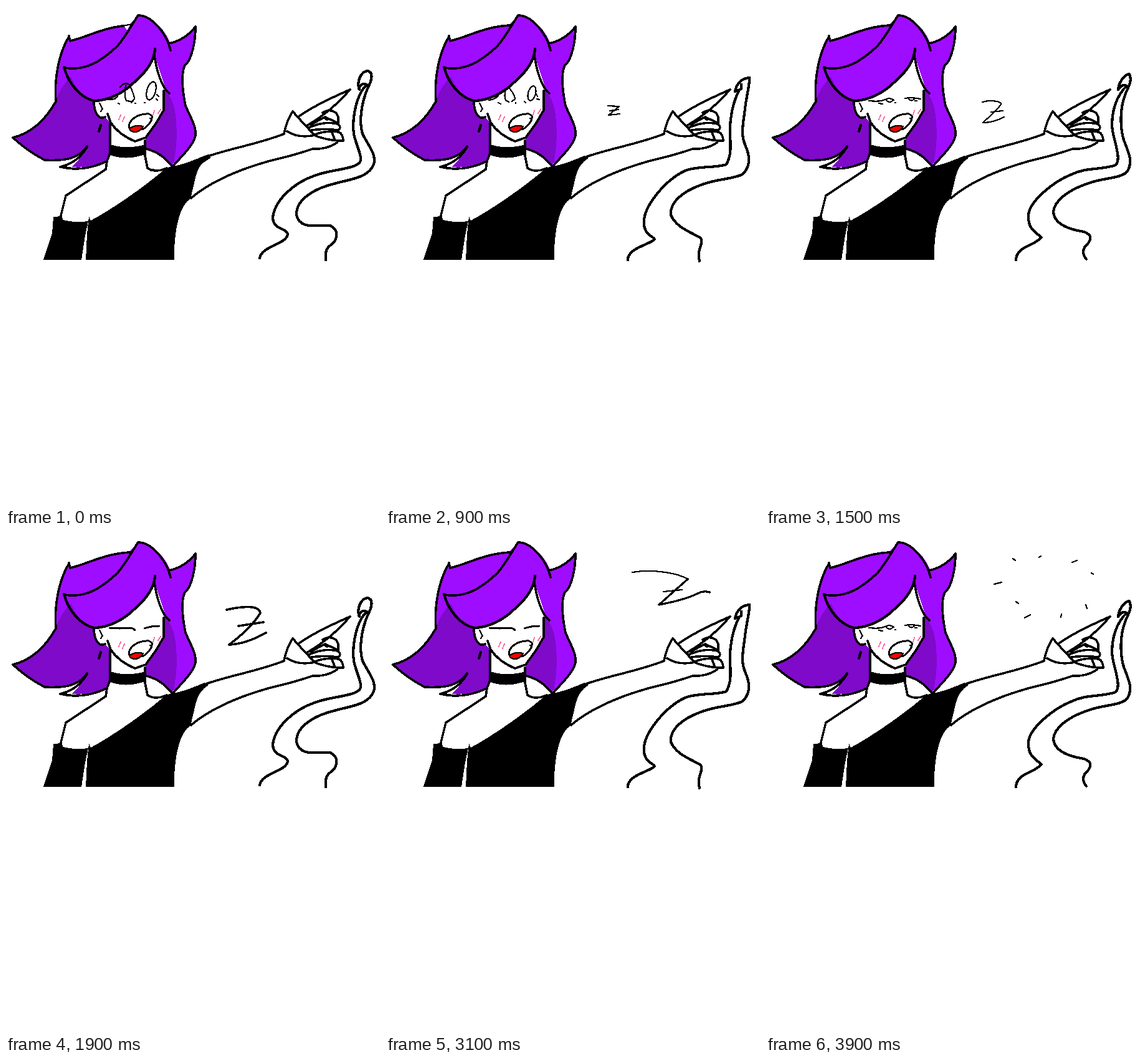
Animation of 600x800 px, one loop 3950 ms. Source, as an HTML page:

```html
<!DOCTYPE html>
<html lang="en">
<head>
<meta charset="utf-8">
<title>Sleepy spell</title>
<style>
html, body { margin: 0; width: 100%; height: 100%; overflow: hidden; background: #fff; }
svg { display: block; width: 600px; height: 800px; fill: none; stroke: #000; stroke-width: 3.6;
  stroke-linecap: round; stroke-linejoin: round; shape-rendering: crispEdges; }
.flat { stroke: none; }
.thin { stroke-width: 2.2; }
.thick { stroke-width: 4.2; }
.white { fill: #fff; }
.black { fill: #000; }
.bright { fill: #9e0dff; }
.dark { fill: #7f0aca; }
[data-part] { display: none; }
</style>
</head>
<body>
<svg viewBox="0 0 600 800">
  <!-- hair -->
  <g class="flat">
    <path class="dark" d="M112 100L85 125L80 153C62 185 40 204 11 211Q35 233 62 247C95 249 118 244 130 225Q121 245 105 258Q135 261 162 249L168 235V185L141 152Z"/>
    <path class="dark" d="M254 130H275L285 200L267 257Q248 235 224 228L223 214L253 168Z"/>
    <path class="bright" d="M100 48L103 56C130 50 160 32 198 30L212 15C235 15 255 38 264 60Q288 54 304 33C304 60 297 88 287 96C280 110 284 140 288 160C297 180 306 195 304 208C300 225 282 240 268 257Q278 210 271 168Q267 148 258 139L238 78C232 94 215 114 205 123C180 144 158 152 141 152Q118 145 104 113Q88 129 80 151C77 112 85 75 100 48Z"/>
    <path class="white" d="M141 152C170 151 193 137 205 123C218 111 232 94 238 80Q242 110 254 136L253 166L240 189L223 215V240L227 262L258 260L135 345L87 341L96 304L161 262L168 235V187L158 178Q144 183 141 152Z"/>
  </g>

  <!-- dress -->
  <g class="black flat">
    <path d="M133 337L136 344C170 326 222 290 258 259Q285 255 318 240L325 244Q309 253 304 275L296 309C280 318 269 355 270 407H128L130 366Z"/>
    <path d="M76 338L90 337L91 343Q110 348 132 345L127 368L121 407H60L74 365Z"/>
    <path d="M165 221Q190 231 225 222V237Q195 249 167 239Z"/>
  </g>

  <!-- hair lines -->
  <path d="M101 49C85 75 77 115 80 153C62 185 40 204 11 211Q35 233 62 247C95 249 118 244 130 225"/>
  <path d="M130 226Q116 251 87 258Q123 267 162 249M88 258L103 260"/>
  <path d="M101 48L103 56C130 50 160 32 200 31"/>
  <path d="M95 99C130 105 155 86 178 65C193 48 201 31 212 15C235 15 258 45 264 71"/>
  <path class="thick" d="M93 98C100 125 120 147 141 152C165 152 190 138 205 123C225 106 238 88 239 69"/>
  <path d="M238 77C240 98 249 130 262 140"/>
  <path d="M262 60Q288 54 304 33C304 60 297 88 287 95C280 110 284 140 288 160C297 180 306 195 304 208C300 225 282 240 267 258Q250 235 225 229"/>

  <!-- head and shoulders -->
  <path d="M141 152C141 170 148 183 159 178M163 173L168 187Q182 207 207 217L224 211L240 189L253 167V136"/>
  <path class="thin" d="M150 156L155 165L152 169"/>
  <path class="thick" d="M152 191L149 201"/>
  <path d="M167 188V236L162 249L160 262L96 304L87 340M223 216V240L227 260Q240 268 258 260"/>
  <path stroke-width="3" d="M198 196Q196 191 200 185C206 177 218 172 229 173Q238 177 233 181L231 180M234 182Q228 193 219 198"/>
  <path class="thin" fill="#f00" d="M198 197Q207 189 220 193Q216 202 206 202Q199 201 198 197Z"/>
  <path stroke="#ff5a9a" stroke-width="1.6" d="M184 175L181 182M190 178L187 185M238 168L236 174M248 166L244 172"/>

  <!-- arm and hand -->
  <path d="M318 243C352 230 410 220 446 205M297 308C332 278 390 255 449 242Q475 235 492 229C508 230 522 225 531 219"/>
  <path d="M446 205Q450 184 460 169Q473 184 495 207M451 201C465 210 482 210 496 207"/>
  <path d="M470 177C490 162 520 148 552 134C535 153 515 173 484 191"/>
  <path d="M508 171C517 165 530 167 533 178V188M489 190L512 178L529 186M510 179L515 182"/>
  <path d="M486 195Q510 184 532 189Q539 194 533 199Q510 196 490 199"/>
  <path d="M494 207Q510 199 534 202Q541 206 541 216Q515 216 494 207M523 203L527 213"/>

  <!-- first strokes -->
  <g data-part="rough">
    <path class="white flat" d="M190 32L199 31L194 39Z"/>
    <path class="black thin" d="M316 242L325 239L327 243L315 251Z"/>
    <path class="thin" d="M227 259L232 264L237 262M163 150L175 149"/>
  </g>

  <!-- eyes -->
  <g class="thin" data-part="wide">
    <path d="M165 150Q173 151 179 145M183 130Q190 121 198 126Q206 143 206 149L201 155M192 127Q189 144 193 152L201 153"/>
    <ellipse cx="233" cy="136" rx="7" ry="15" transform="rotate(15 233 136)"/>
    <path d="M180 156L182 157M207 156H208M222 155H223M242 142L245 145M241 149L243 151"/>
  </g>
  <g class="thin" data-part="open">
    <path d="M165 151Q174 150 180 144M192 134Q189 145 192 151L197 154M198 132Q206 141 207 149L202 153"/>
    <ellipse cx="234" cy="140" rx="6" ry="12" transform="rotate(15 234 140)"/>
    <path d="M180 155L184 157M208 155V156M222 153L224 155M241 141L243 145M242 149L246 150"/>
  </g>
  <g class="thin" data-part="drowsy">
    <path d="M165 152Q184 150 190 144Q199 139 206 147M192 146Q191 154 198 154Q205 154 204 146M223 149Q233 137 247 145M229 145Q230 153 236 152Q241 149 239 143M181 156L187 157M208 155V156"/>
  </g>
  <g class="thin" data-part="half">
    <path d="M165 152Q184 154 191 150Q199 146 205 151M193 151Q198 157 204 151M181 156L187 157M207 155H208M223 148Q234 146 248 149M229 149Q233 154 238 149M239 152L242 152"/>
  </g>
  <path data-part="closed" stroke-width="3" d="M166 152Q183 154 198 152Q204 152 207 156M222 153Q233 149 246 149"/>

  <!-- smoke ribbon -->
  <g class="thick" data-part="right">
    <path d="M567 134C562 122 569 105 580 104C590 106 587 119 581 130C570 155 566 185 572 205C582 225 592 235 591 250C585 275 555 277 530 284C495 292 465 310 466 335C472 360 500 350 520 352C537 360 530 378 520 384Q511 390 513 407"/>
    <path d="M566 133Q569 122 579 126L572 134C560 153 555 185 558 205C562 225 572 240 568 250C560 262 520 262 495 272C460 284 430 313 428 340C430 360 450 355 452 366C450 382 410 385 407 404"/>
  </g>
  <g class="thick" data-part="middle">
    <path d="M565 134C566 122 575 110 583 109C588 120 581 130 577 140C567 165 568 195 574 215C584 240 588 250 580 265C570 277 540 275 515 285C485 295 462 313 461 330C462 350 485 358 510 362C527 368 520 378 511 387Q506 397 514 406"/>
    <path d="M566 133Q570 125 579 128L574 133C558 152 553 180 556 200C560 222 570 245 561 255C540 263 515 258 490 270C460 282 423 313 421 335C420 358 432 362 442 371C430 385 402 385 401 407"/>
  </g>
  <g class="thick" data-part="left">
    <path d="M560 137C562 125 570 116 583 115C584 125 578 145 576 165C572 195 569 206 577 225C586 245 582 260 572 270C555 278 530 277 505 287C475 298 455 315 457 335C465 355 490 363 505 372C510 383 498 388 503 409"/>
    <path d="M560 137L570 133V126M567 134C556 155 551 182 552 205C553 225 554 240 546 254C530 260 500 256 480 264C448 279 410 323 414 352C418 370 428 368 431 374C422 383 388 388 388 407"/>
  </g>

  <!-- growing letter -->
  <path class="thin" data-part="z1" d="M356 160L374 161L357 175L375 173M359 168L373 166"/>
  <path class="thin" data-part="z2" d="M347 154C360 150 380 153 377 158Q369 168 348 187Q365 187 382 178M361 170L380 168"/>
  <path data-part="z3" d="M354 123Q405 112 408 128Q395 151 358 179Q385 178 417 160M373 149L413 143"/>
  <g data-part="z4">
    <path class="thin" d="M346 106Q424 97 429 106M397 129H424"/>
    <path d="M429 106Q421 125 373 162Q430 146 469 122"/>
  </g>
  <g data-part="z5">
    <path class="thin" d="M395 63C430 57 470 65 484 74M445 94L475 91"/>
    <path stroke-width="3.2" d="M484 74Q460 95 438 115Q480 107 500 97Q510 92 519 95"/>
  </g>
  <path id="sparks" class="thin" data-part="sparks" vector-effect="non-scaling-stroke" d="M366 82L378 79M396 41L400 44M438 39L441 37M491 47L499 44M522 64L525 66M513 115L515 121M474 130L473 135M415 136L424 131M401 110L405 113"/>
</svg>
<script>
const LOOP = 3950;
// start time, ribbon pose, eyes, extra part, spark spread
const poses = [
  [0, "right", "wide", "rough"],
  [100, "right", "wide"],
  [300, "middle", "open"],
  [900, "left", "open", "z1"],
  [1300, "middle", "drowsy", "z2"],
  [1500, "middle", "half", "z2"],
  [1700, "right", "half", "z3"],
  [1900, "right", "closed", "z3"],
  [2300, "middle", "closed", "z4"],
  [3100, "left", "closed", "z5"],
  [3700, "middle", "closed", "sparks", 0.77],
  [3900, "middle", "half", "sparks", 1]
];
const parts = [...document.querySelectorAll("[data-part]")];
const sparks = document.getElementById("sparks");
const begin = performance.now();
let shown;

function show(pose) {
  const [, ribbon, eyes, extra, spread = 1] = pose;
  for (const part of parts) {
    part.style.display = [ribbon, eyes, extra].includes(part.dataset.part) ? "inline" : "none";
  }
  sparks.setAttribute("transform", `translate(450 88) scale(${spread}) translate(-450 -88)`);
}

function tick(now) {
  const time = Math.max(0, now - begin) % LOOP;
  const pose = poses.findLast(([start]) => start <= time);
  if (pose !== shown) show(shown = pose);
  requestAnimationFrame(tick);
}
tick(begin);
</script>
</body>
</html>
```
